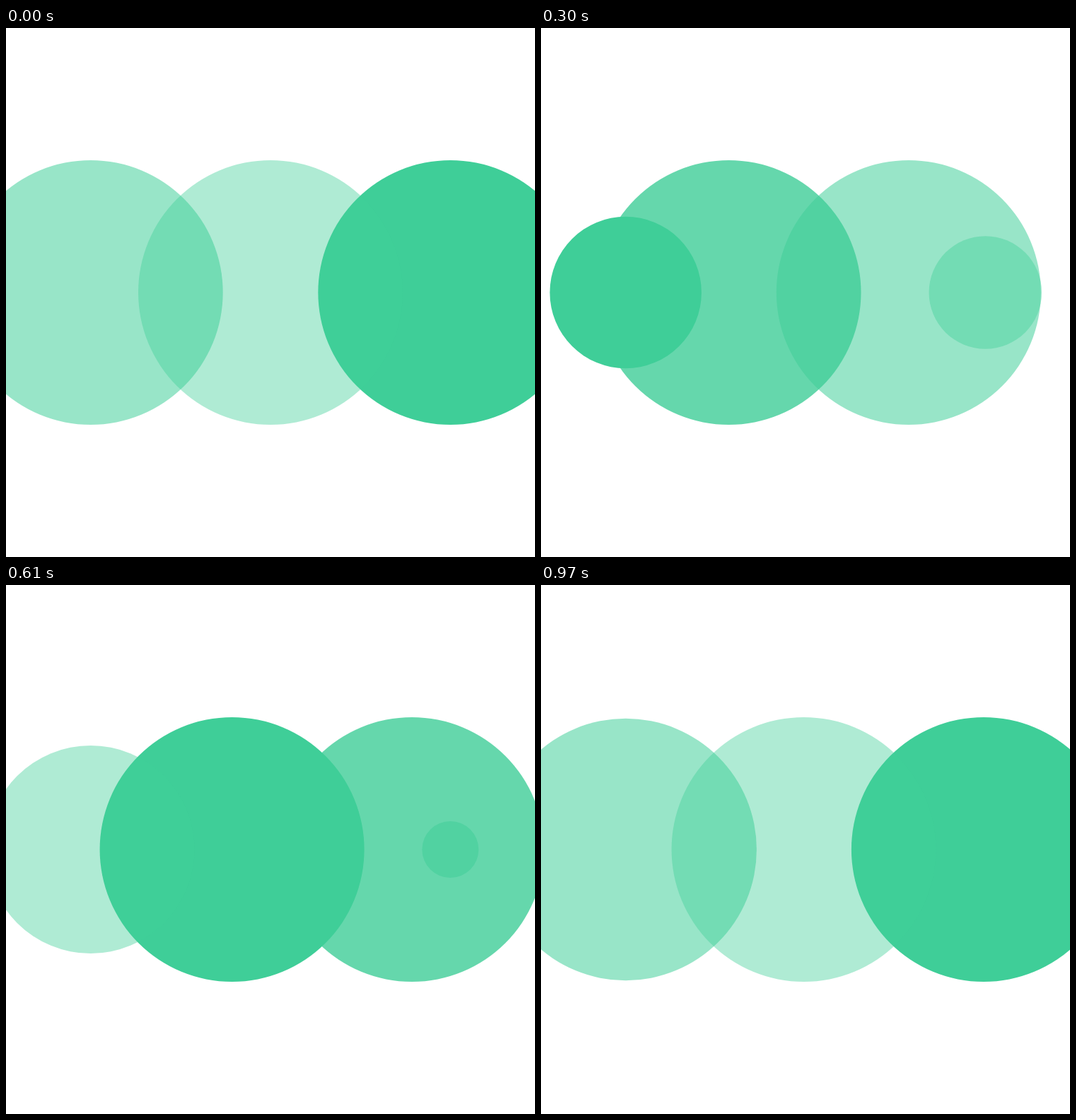
Recreate the animation shown at these times as an HTML page with a canvas. Size 748 by 748 pixels, loop 1 s.

```html
<!DOCTYPE html>
<html lang="en">
<head>
<meta charset="utf-8">
<title>Loader</title>
<style>
  html, body { margin: 0; width: 100%; height: 100%; overflow: hidden; background: #fff; }
  canvas { display: block; width: 100vw; height: 100vh; }
</style>
</head>
<body>
<canvas id="stage" width="748" height="748"></canvas>
<script>
const ctx = document.getElementById('stage').getContext('2d');
const SIZE = 748, MID = SIZE / 2, R = SIZE / 4, STEP = SIZE * 0.34;
const LEFT = MID - STEP, RIGHT = MID + STEP;
const LOOP = 1000, FRAMES = 33;
const ALPHAS = [0.8, 1, 0.415, 0.533];

// cubic-bezier(0, 0.5, 0.5, 1), solved by bisection
function ease(x) {
  let lo = 0, hi = 1, s;
  for (let i = 0; i < 30; i++) {
    s = (lo + hi) / 2;
    if (1.5 * s * s - 0.5 * s ** 3 < x) lo = s; else hi = s;
  }
  const u = 1 - s;
  return 1.5 * u * u * s + 3 * u * s * s + s ** 3;
}

function disc(x, r, alpha) {
  ctx.globalAlpha = alpha;
  ctx.beginPath();
  ctx.arc(x, MID, r, 0, Math.PI * 2);
  ctx.fill();
}

function draw(ms) {
  // 33 even poses, each starting on a whole hundredth of a second
  const tick = Math.floor((ms % LOOP + 0.5) / 10);
  const pose = Math.floor((tick + 0.5) * FRAMES / 100) % FRAMES;
  const beat = pose * 4 / FRAMES, phase = Math.floor(beat);
  const e = ease(beat - phase);
  const alpha = role => ALPHAS[(phase - role + 4) % 4];

  ctx.clearRect(0, 0, SIZE, SIZE);
  ctx.fillStyle = '#3fce98';
  disc(RIGHT, R * (1 - e), alpha(3));
  disc(MID + STEP * e, R, alpha(2));
  disc(LEFT + STEP * e, R, alpha(1));
  disc(LEFT, R * e, alpha(0));
}

const start = performance.now();
function loop() {
  draw(performance.now() - start);
  requestAnimationFrame(loop);
}
loop();
</script>
</body>
</html>
```
